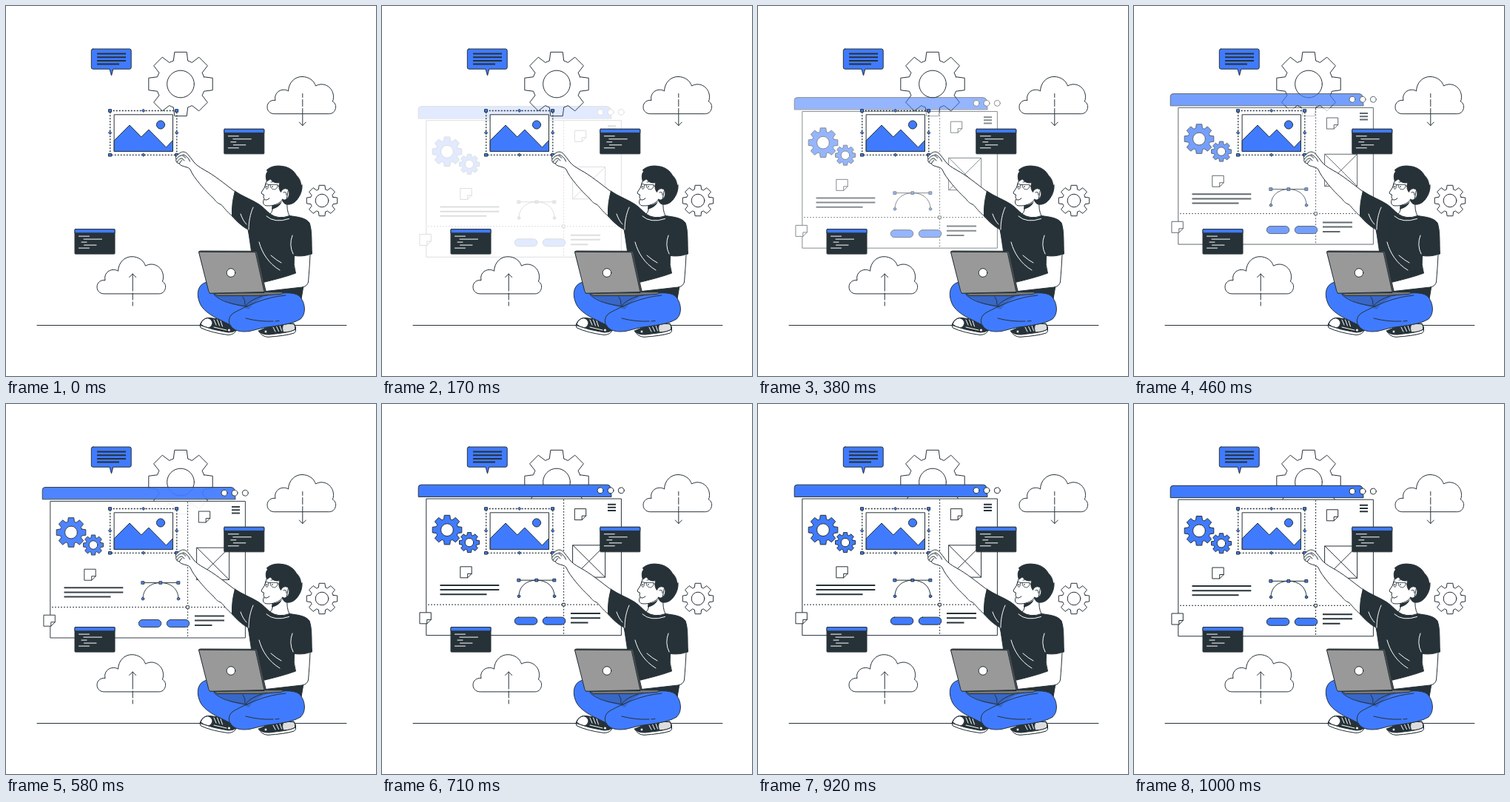
Recreate the animation shown at these times as an HTML page. Size 500 px wide and 500 px high, loop 1.04 s.

```html
<!DOCTYPE html>
<html lang="en">
<head>
<meta charset="utf-8">
<title>Building a page</title>
<style>
  html, body { margin: 0; width: 100%; height: 100%; overflow: hidden; background: #fff; }
  svg { display: block; width: 100vw; height: 100vh; }
  .ink { fill: #fff; stroke: #263238; stroke-width: 1; stroke-linejoin: round; stroke-linecap: round; }
  .blue { fill: #407bff; }
  .dark { fill: #263238; }
  .none { fill: none; }
  .text { fill: none; stroke-width: 2; stroke-linecap: butt; }
  .light { fill: none; stroke: #fff; }
  .dots { fill: none; stroke-dasharray: 2 2; stroke-linecap: butt; }
</style>
</head>
<body>
<svg viewBox="0 0 500 500">
  <defs>
    <path id="cloud" d="M362 145.700C356 145.500 353 141 353 136.500C353 130.500 358 126.500 364 127.500C362 119.500 368 113 375.500 113.200C378 113.200 380 114 381.500 115C382 103.500 390 95.500 400 95.500C409 95.500 416 100.500 418.500 108C430 101.500 443 110.500 442.500 123.500Q442.500 127 441.300 129C445 131 446.300 135 445.300 138.500C444.300 143 441 145.700 437 145.700Z"/>
    <path id="arrow" fill="none" d="M0 0V-23M0 -26V-35M0 -38V-43M-4.500 -4.500L0 0L4.500 -4.500"/>
    <g id="code">
      <rect class="dark" width="54" height="33.500" rx=".8"/>
      <path class="blue" d="M0 5V.8Q0 0 .8 0H53.200Q54 0 54 .8V5Z"/>
      <path class="light" d="M5.500 9.500H19.500M12 13.500H36.500M9 17.500H16M12.500 21.500H29M5.500 25.500H19.500"/>
    </g>
    <path id="note" d="M0 0H15V9.500L9.500 15H0ZM15 9.500H9.500V15"/>
  </defs>

  <g class="ink">
    <g data-gear="236 105.500 43.200"></g>
    <path d="M42 431.500H460"/>
    <use href="#cloud"/>
    <use href="#cloud" x="-230" y="243.200"/>
    <use href="#arrow" x="400.800" y="161.500"/>
    <use href="#arrow" transform="translate(171.200 362) scale(1 -1)"/>
    <g data-gear="427 263 20.700"></g>
    <path class="blue" d="M117.500 58H167Q169.200 58 169.200 60.200V83Q169.200 85.200 167 85.200H144.800L142.500 94L140 85.200H117.500Q115.300 85.200 115.300 83V60.200Q115.300 58 117.500 58Z"/>
    <path class="text" d="M123 64.500H162M123 69.200H162M123 73.900H162M123 78.600H153"/>
  </g>

  <g id="page" class="ink" opacity="0">
    <path class="blue" d="M49.200 126.200V114Q49.200 110.300 53 110.300H304Q308 110.300 309 114L310 126.200Z"/>
    <circle cx="295" cy="118" r="4"/><circle cx="309" cy="118" r="4"/><circle cx="323.300" cy="118" r="4"/>
    <rect x="60.200" y="129.200" width="263.200" height="184.600"/>
    <path class="dots" d="M245.600 130V313M62 272.300H323"/>
    <rect x="243.800" y="270.500" width="3.600" height="3.600"/>
    <g class="blue" data-gear="88 171.300 19.800"></g>
    <g class="blue" data-gear="118 188.300 13.500"></g>
    <path class="text" d="M305 136.800H316M305 141H316M305 145.200H316M78.500 246.100H158.300M78.500 252.200H158.300M78.500 258.300H141.500M255 284.200H295M255 290.300H295M255 296.700H278.500"/>
    <use href="#note" x="260.700" y="142.800"/>
    <use href="#note" x="106.200" y="221"/>
    <use href="#note" x="51.300" y="283"/>
    <path class="none" d="M185 239.300H233M185 261C185 247 196 239.300 209 239.300S233 247 233 261"/>
    <g class="blue">
      <path d="M183.200 237.500h3.600v3.600h-3.600zM207.200 237.500h3.600v3.600h-3.600zM231.200 237.500h3.600v3.600h-3.600z"/>
      <circle cx="185" cy="261" r="1.800"/><circle cx="233" cy="261" r="1.800"/>
      <rect x="179.300" y="289.300" width="30.500" height="10" rx="5"/>
      <rect x="217.300" y="289.300" width="30.500" height="10" rx="5"/>
    </g>
    <path d="M258 192H301.600V235.300H258ZL301.600 235.300M301.600 192L258 235.300"/>
  </g>

  <g class="ink">
    <use href="#code" x="294.800" y="166.300"/>
    <use href="#code" x="93" y="301.600"/>

    <!-- selected picture -->
    <rect x="146.500" y="146.800" width="79" height="49.700"/>
    <path class="blue" d="M146.500 181.500L167 161L182.800 177L192.800 167L216.500 191L225.500 181.500V196.500H146.500Z"/>
    <circle class="blue" cx="209" cy="160.500" r="5.600"/>
    <rect class="dots" x="140.700" y="141.500" width="90.100" height="59.800" stroke-width="1.300"/>
    <path class="blue" d="M138.900 139.700h3.600v3.600h-3.600zM229 139.700h3.600v3.600h-3.600zM138.900 199.500h3.600v3.600h-3.600zM229 199.500h3.600v3.600h-3.600zM185.800 139.500l2 2l-2 2l-2 -2zM185.800 199.300l2 2l-2 2l-2 -2zM140.700 169.400l2 2l-2 2l-2 -2zM230.800 169.400l2 2l-2 2l-2 -2z"/>

    <!-- raised arm -->
    <path d="M309 250.500C295 240 282 229 268 221.500C262 218 257 215 254 211C251 207 248 203 245 199.500C242 196.500 238 196.500 235 198.500L230.500 202.500Q228.500 204.500 230 207C229 210 231 212 234 213C236 216 240 216.500 243 217.500Q247 218 249 221C252 228 256 233 262 240.500C268 248 276 256 281 260.500C284 265 287 267 290 268C294 271 297 277 306 284Z"/>
    <path class="none" d="M230.500 206.500Q235 201 239 202L243 205.500M231 211Q234.500 205.500 238 206L241 209M234.500 213Q235 209.500 238 208.500M239 200.500Q246 203 248.500 210"/>

    <!-- shoes -->
    <path class="dark" d="M262.500 430Q265 422 274 421.300L287 423L303 429L311.500 438Q309 443 300 443.500Q278 441 264 435Q261.500 434 262.500 430Z"/>
    <path d="M263 430Q266 422 273 421.700Q279 424 279 429Q278 433.500 274 435Q267 434 263 430Z"/>
    <path d="M262.300 431.500Q280 438 300 441Q308 441 311.500 437.500Q309 444.300 300 444.500Q277 441.500 263.500 435Z"/>
    <path class="light" d="M281 424L284 431M285.500 424L288.500 432M290 425.500L292.500 433M281 434L298 438"/>
    <circle cx="301.500" cy="438" r="2"/>
    <path class="dark" d="M341.500 439L353 434L375 429.500L389 429Q392.500 433 391.500 439Q388 443 377 444.500L354 447Q346 446 341.500 439Z"/>
    <path style="fill:#ddd" d="M375 430.500Q382 428.500 389 429.700Q391.500 433 390.500 437.500Q384 441 375 441Q372 435 375 430.500Z"/>
    <path d="M341.500 439.500Q346 444.500 356 444L376 441.500Q386 440 391.500 437Q392 440 389.500 442Q376 446 354 447.300Q346 447 341.500 439.500Z"/>
    <path class="light" d="M361 434L364 440M365.500 433L368.500 439.500M370 432L372.500 439"/>
    <circle cx="351" cy="440" r="2"/>

    <!-- torso -->
    <path class="dark" d="M309.500 250.300C319 257 333 262 342 268C348 272 352 277 357 281Q369 289 383 283.500C394 285 405 286 410 293C414 304 412.500 320 413.500 335Q402 339 389.500 337.500L391 358L402 378L399 396H340L332 334C330 322 329 312 327 302C319 298 312 291 305.500 284C305 272 306.500 260 309.500 250.300Z"/>
    <path class="light" d="M352 284Q363 294 382.500 287.500M334 272C330 281 328 291 328 302M387 310Q382 323 388 335M317 281Q320 290 325 295M342 319C346 334 355 348 370 357M358 337Q366 344 372 347"/>

    <!-- legs -->
    <path class="blue" d="M273 373C261 374 256.500 386 261 399C264 410 276 418 291 425L303 431C307 439 317 441 329 439.500L349 434.500C367 432 387 430 398 423C405 417 406 402 396 391.500C388 386 372 387 352 391L281 389Z"/>
    <path class="dark" opacity=".28" stroke="none" d="M281 391L305 403Q323 407 328 410Q335 399 352 391.500Z"/>
    <path class="none" d="M378 391C351 393 326 405 309 414Q299 419 302 430M281 390C291 400 306 403 326 406M346 392Q330 397 324 405M320 393Q324 398 323 404M324 422Q343 427 361 426M364 426L369 425.500"/>

    <!-- resting arm -->
    <path d="M389.500 337.500Q402 339 411 335.500C410.500 348 409.500 361 408.500 373Q407 379 400 380L351 385.500L347.500 373.500C362 370 378 366 391.500 361Q388 350 389.500 337.500Z"/>

    <!-- laptop -->
    <path style="fill:#777" d="M281 388L350 386.500H374Q375 389 371 389.500L340 391.500H286Z"/>
    <path style="fill:#555" d="M261 331.500Q262 330.800 264 331L337 331.300Q339 331.500 339.500 333L351 385.500L349 387.500L276 388.300Z"/>
    <path style="fill:#999" d="M260.800 332.300L335.500 332.700Q337 333 337.500 334.500L349 386.500L276.500 388.200Q274.500 388 274 386Z"/>
    <circle cx="304" cy="360.500" r="5.800"/>

    <!-- head -->
    <path d="M361 268.500Q361 277 357 281Q368 289 383 283.500Q379 276 380 263L369 253Z"/>
    <path class="dark" stroke="none" d="M359.500 269Q367 270 373 264Q370 272 359 275Z"/>
    <path d="M353 234C351.500 238 350.500 242 349.500 245L345 252Q345 254.500 348.500 255L348 258.500L349 260.500L347.500 263.500Q347 268 350 269.500C357 271 367 269 372.500 263L379 262L383 240L364 229Z"/>
    <path class="dark" d="M352.500 236.500C350.500 232 351 226 353.500 224L352.500 221.500C358 216.500 366 215.300 373 216.500C381 217 389 222 392.500 229C397 233 399 239 398.500 244L400 241.500C400.500 249 398 256 393 262C389 267 383 269.500 377 267.500Q374 265 373 261Q376 263.500 379.500 261C383.500 257 384 250.500 380.500 247.500C376 245.500 373 248 371.500 251.500C369 248 368 244 370 238.500C365 240 360 238 357.500 234Z"/>
    <path class="none" d="M375 252Q379 249.500 379 255.500M349.500 262Q353 263 356 260"/>
    <path class="none" stroke-width=".8" d="M350.500 240.500L354.500 241Q355.500 245 353 247.500Q350 247 350.500 240.500ZM357 241.500H367Q367.500 247 362.500 248Q357 247.500 357 241.500ZM354.500 241.500H357M367 242.500L371.500 245M358 238Q362.500 236.500 366 238"/>
    <path stroke-width="1.200" d="M352.500 243.500V244.500M360 243.500V244.500"/>
  </g>
</svg>
<script>
  const gearPath = (cx, cy, size) => {
    const root = size * .76;
    const at = (angle, along, across) => {
      const c = Math.cos(angle), s = Math.sin(angle);
      return `${cx + along * c - across * s} ${cy + along * s + across * c}`;
    };
    let d = '';
    for (let i = 0; i < 8; i++) {
      const a = i * Math.PI / 4, base = size * .225, tip = size * .19;
      d += `${i ? `A${root} ${root} 0 0 1 ` : 'M'}${at(a, root * .956, -base)}`;
      d += `L${at(a, size, -tip)}L${at(a, size, tip)}L${at(a, root * .956, base)}`;
    }
    return d + `A${root} ${root} 0 0 1 ${at(0, root * .956, -size * .225)}Z`;
  };

  for (const g of document.querySelectorAll('[data-gear]')) {
    const [x, y, size] = g.dataset.gear.split(' ').map(Number);
    g.innerHTML = `<path d="${gearPath(x, y, size)}"/>
      <circle cx="${x}" cy="${y}" r="${size * .425}" style="fill:#fff"/>`;
  }

  // cubic-bezier(.36, -.01, .5, 1.38): rises, overshoots, settles
  const curve = (s, p1, p2) => 3 * p1 * s * (1 - s) ** 2 + 3 * p2 * s * s * (1 - s) + s ** 3;
  const ease = x => {
    let lo = 0, hi = 1;
    for (let i = 0; i < 24; i++) {
      const mid = (lo + hi) / 2;
      if (curve(mid, .36, .5) < x) lo = mid; else hi = mid;
    }
    return curve(lo, -.01, 1.38);
  };

  const LOOP = 1040, FPS = 24;
  const page = document.getElementById('page');
  const start = performance.now();

  function draw() {
    const t = (performance.now() - start) % LOOP;
    const step = Math.floor((t + 4) * FPS / 1000);
    const p = step < 2 ? 0 : ease(Math.min(1, (step + 1) / 24.5));
    page.setAttribute('opacity', Math.max(0, Math.min(1, p)));
    page.setAttribute('transform', `translate(0 ${30 * (1 - p)})`);
    requestAnimationFrame(draw);
  }
  draw();
</script>
</body>
</html>
```
